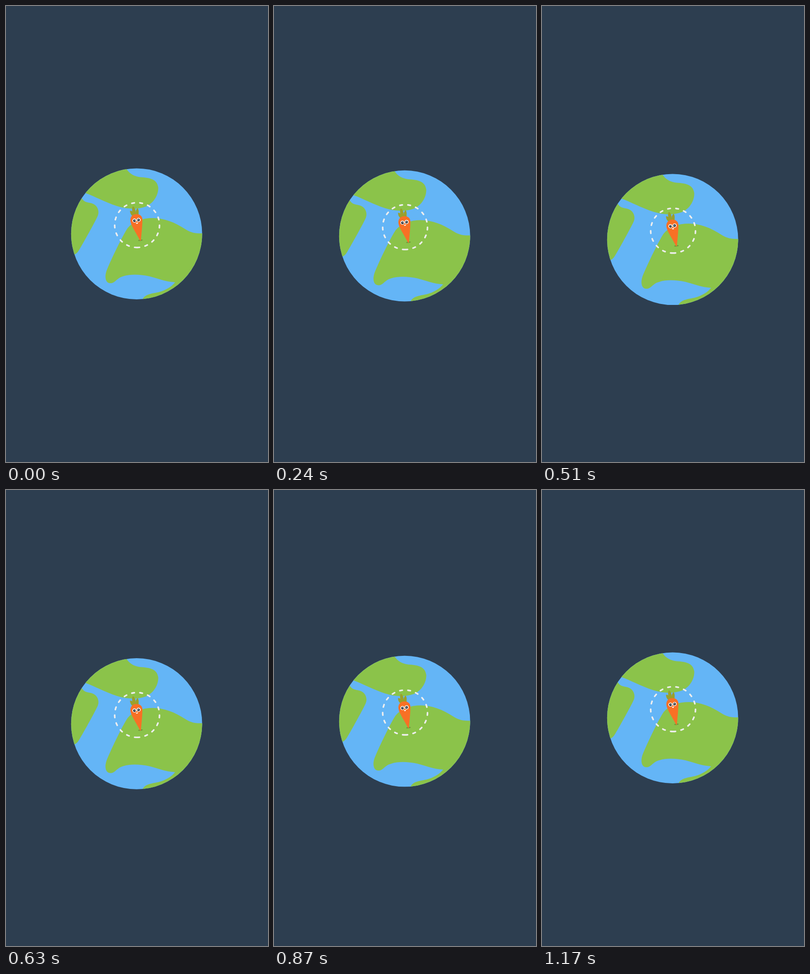
An HTML page that plays this animation: 567 by 987 pixels, repeating every 1.2 s.

```html
<!DOCTYPE html>
<html lang="en">
<head>
<meta charset="utf-8">
<title>Floating globe</title>
<style>
  html, body { margin: 0; height: 100%; overflow: hidden; background: #2d3e50; }
  svg { display: block; width: 100%; height: 100%; }
</style>
</head>
<body>
<svg viewBox="0 0 567 987">
  <clipPath id="disc"><circle cx="282.7" cy="493.2" r="141.8"/></clipPath>
  <g id="globe">
    <circle cx="282.7" cy="493.2" r="141.8" fill="#64b5f6"/>
    <g clip-path="url(#disc)" fill="#8bc34a">
      <path d="M261 353C267 363 278 369 291 370.500C311 372 327 374 329.500 393C330 410 319 427 303 434C285 441 262 440 240 433C215 425 190 411 172 405L140 380L200 335L261 345Z"/>
      <path d="M164 416C167 422 173 425 181 426C196 428 203 441 199 453C196 462 166 515 160 525C156 532 153 536 148 538L130 538L130 416Z"/>
      <path d="M426 492C406 493 398 489 388 483C365 468 342 459 318 459C295 459 275 466 263 481C252 497 222 560 217 575C213 588 216 600 226 600C235 600 238 592 248 587C267 579 290 581 310 585C330 590 345 597 366 598C358 608 346 615 330 619.500C313 623 300 624 295 636L300 660L440 660L440 492Z"/>
    </g>
    <circle r="48.5" transform="translate(283.7 474.200) rotate(90)" pathLength="360" fill="none" stroke="#eee" stroke-width="3.4" stroke-linecap="round" stroke-dasharray="6.5 14.3"/>
    <ellipse cx="291" cy="507" rx="5" ry="1.400" fill="#6f983c" transform="rotate(-8 291 507)"/>
    <g fill="#9aa02c">
      <path d="M279 456C272 456 268 449 268.500 443C274 443 279 449 279 456Z"/>
      <path d="M280 456C273 449 271 439 274.500 433.500C280 436 282 447 280 456Z"/>
      <path d="M280 456C279 448 281 440 285 437.500C288 442 288 450 284 456Z"/>
      <path d="M272 450L287 448L287 455L276 456Z"/>
    </g>
    <path d="M269.200 465C268.500 456 274 451 281.500 450.500C290 450 295.500 455 295.300 463C295 477 293 495 291.800 507.500Q291 509 290 507.500C283 493 270 475 269.200 465Z" fill="#f87025"/>
    <g fill="#fff">
      <circle cx="278" cy="464.500" r="4.400"/>
      <circle cx="286.900" cy="463" r="4.400"/>
      <path d="M280.700 469.200Q283.500 469.500 286 468.200Q285.500 471.200 283.700 471.400Q281.800 471.400 280.700 469.200Z"/>
    </g>
    <g fill="#333a40">
      <circle cx="278.100" cy="464.700" r="2.900"/>
      <circle cx="286.800" cy="463.100" r="2.900"/>
    </g>
    <g fill="#fff">
      <circle cx="279.200" cy="464" r=".9"/>
      <circle cx="286" cy="462.700" r=".9"/>
    </g>
  </g>
</svg>
<script>
  const LOOP = 1200, DROP = 12.8;
  const globe = document.getElementById('globe');

  function draw(now) {
    const y = DROP * (1 - Math.cos(2 * Math.PI * now / LOOP)) / 2;
    globe.setAttribute('transform', `translate(0 ${y.toFixed(3)})`);
    requestAnimationFrame(draw);
  }
  draw(0);
</script>
</body>
</html>
```
